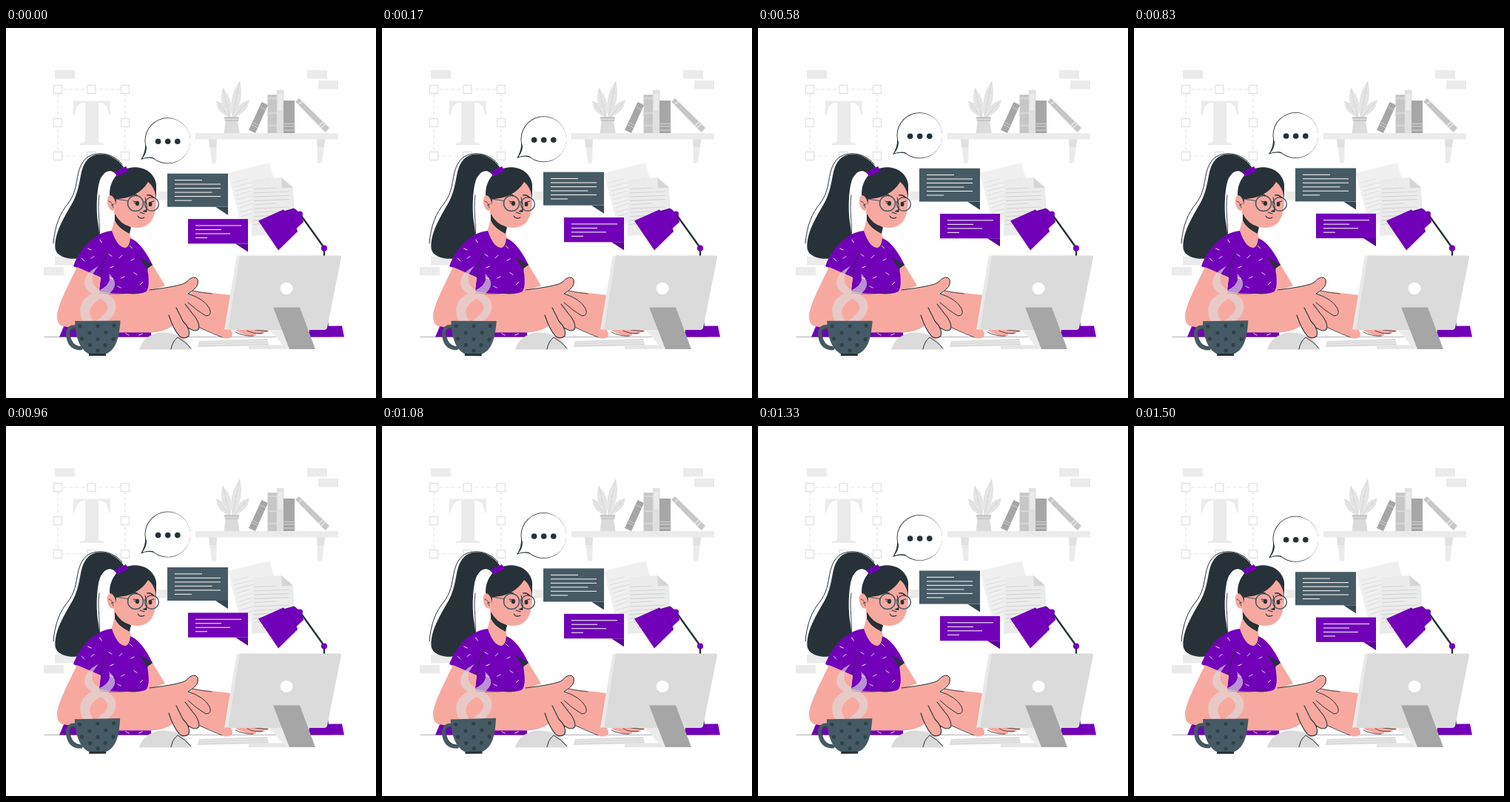
Animation, 500 px wide and 500 px high, one loop 1.54 s. Source, as an HTML page with a canvas:

```html
<!DOCTYPE html>
<html lang="en">
<head>
<meta charset="utf-8">
<style>
html, body { margin: 0; width: 100%; height: 100%; overflow: hidden; background: #fff; }
canvas { display: block; width: 100vw; height: 100vh; }
</style>
</head>
<body>
<canvas id="stage"></canvas>
<script>
const LOOP = 1540;
const LEAD = 55;
const PURPLE = '#7200b8', DEEP = '#5b0099', INK = '#263238', SLATE = '#455a64', SKIN = '#f7a9a0';
const PALE = '#ebebeb', LIGHT = '#e0e0e0', GREY = '#dbdbdb', MID = '#c7c7c7', DARK = '#a6a6a6';

const canvas = document.getElementById('stage');
const ctx = canvas.getContext('2d');

function fill(color, d) {
  ctx.fillStyle = color;
  ctx.fill(new Path2D(d));
}

function line(color, width, d) {
  ctx.strokeStyle = color;
  ctx.lineWidth = width;
  ctx.stroke(new Path2D(d));
}

function rect(color, x, y, w, h) {
  ctx.fillStyle = color;
  ctx.fillRect(x, y, w, h);
}

function oval(color, x, y, rx, ry = rx, turn = 0) {
  ctx.fillStyle = color;
  ctx.beginPath();
  ctx.ellipse(x, y, rx, ry, turn, 0, 7);
  ctx.fill();
}

function ring(color, width, x, y, r) {
  ctx.strokeStyle = color;
  ctx.lineWidth = width;
  ctx.beginPath();
  ctx.arc(x, y, r, 0, 7);
  ctx.stroke();
}

function at(x, y, turn, draw) {
  ctx.save();
  ctx.translate(x, y);
  ctx.rotate(turn);
  draw();
  ctx.restore();
}

function drawWall() {
  for (const [x, y] of [[66, 57], [407, 57], [422, 71], [66, 309], [51, 323], [205, 221]])
    rect(PALE, x, y, 27, 11.5);

  ctx.setLineDash([4, 4]);
  line('#e4e4e4', 1.2, 'M70 83H161V173H70Z');
  ctx.setLineDash([]);
  for (const x of [70, 115.5, 161])
    for (const y of [83, 128, 173]) {
      if (x === 115.5 && y === 128) continue;
      rect('#fff', x - 5.5, y - 5.5, 11, 11);
      line('#e4e4e4', 1.3, `M${x - 5.5} ${y - 5.5}h11v11h-11Z`);
    }
  fill(PALE, 'M91 98.5H140.5L141 117H139C137 106 134 101 125 101V150C125 155 127 155.5 132 156V158H100V156C105 155.5 107 155 107 150V101C98 101 95 106 92.5 117H90.5Z');
}

function drawLeaf(x, y, turn, length, width) {
  at(x, y, turn, () => {
    fill('#e6e6e6', `M0 0C${-width} ${-length * .35} ${-width} ${-length * .7} 0 ${-length}C${width} ${-length * .7} ${width} ${-length * .35} 0 0`);
    line('#cfcfcf', .7, `M0 0V${-length}`);
    for (let k = .35; k < .8; k += .15)
      line('#dadada', .5, `M${-width * .5} ${-length * k - 4}L0 ${-length * k}L${width * .5} ${-length * k - 4}`);
  });
}

function drawShelf() {
  for (const x of [274, 420]) {
    const lean = x < 300 ? 3 : 0;
    fill(PALE, `M${x} 150H${x + 11}L${x + 7 + lean} 182.5H${x + 1 + lean}Z`);
    fill(LIGHT, `M${x} 150H${x + 11}L${x + 10} 161H${x + 1}Z`);
  }
  rect(PALE, 256, 142, 193, 8.5);

  drawLeaf(303, 121, -.7, 29, 7);
  drawLeaf(307, 121, .75, 32, 7);
  drawLeaf(303, 121, -.25, 41, 8);
  drawLeaf(306, 121, .2, 50, 8);
  fill(GREY, 'M297 125H313L315.5 142H294.5Z');
  fill(MID, 'M295 120H315L314 126H296Z');
  line(PALE, .8, 'M295 123.5H315');

  fill(DARK, 'M328 138L345.5 100L354 104L337 142Z');
  line(MID, 1.3, 'M342.5 106.5L351 110.5M333 127.5L341.5 131.5M331.5 130.5L340 134.5');
  rect(MID, 353.5, 90, 13, 52);
  line(GREY, 1.4, 'M353.5 95H366.5M353.5 115H366.5M353.5 132H366.5');
  rect(LIGHT, 366, 84, 9.5, 58);
  rect(PALE, 367.5, 89, 6, 23);
  rect(DARK, 375, 98, 15, 44);
  line(MID, 1.4, 'M375 129.5H390M375 133H390M375 138H390');
  fill(MID, 'M391 99.5L396 95L437 135L431.5 141Z');
  line(PALE, 1.5, 'M395 103.5L400.5 99M423 132L428.5 126.5M426 135L431.5 129.5');
}

function drawPapers() {
  fill('#f0f0f0', 'M299.5 196L356.5 182L374 252L318 267Z');
  for (let i = 0; i < 9; i++)
    line('#dedede', 1.1, `M${307 + i * 1.4} ${209 + i * 5.7}L${i % 3 ? 354 + i : 327 + i} ${i % 3 ? 197.5 + i * 5.5 : 204 + i * 5.5}`);
  fill(PALE, 'M333 205L372 202L388 216L391 277L332 281Z');
  fill('#d6d6d6', 'M372 202L388 215.5L373 216.5Z');
  for (let i = 0; i < 10; i++)
    line('#d4d4d4', 1.1, `M${336 - i * .1} ${217.5 + i * 5.3}L${i % 4 === 0 ? 365 : 382} ${216 + i * 5.2}`);
}

function drawLamp() {
  line(INK, 2.4, 'M397 251L430 297V310');
  line(INK, 2, 'M434 394L435 405');
  fill(DEEP, 'M373 248L389 243.5Q399 251 402 262L389 274Z');
  fill(PURPLE, 'M375 249L391 244.5Q400 252 402 262L392 271Z');
  fill(PURPLE, 'M341 260.5L374.5 245.5Q388 256 394 275L368 300.5Z');
  line(DEEP, .8, 'M375 246Q388 256 393.5 275');
  oval(PURPLE, 397, 251.5, 4);
  oval(PURPLE, 430, 297.5, 4.1);
  fill(PURPLE, 'M411 403L454 402.5L457 417.5H408Z');
}

function drawPonytail() {
  line(INK, 1, 'M64 291C66 267 73 250 84 237C99 217 93 197 104 181C113 166 142 165 157 184');
  fill(INK, 'M159 188C147 171 127 166 113 175C97 189 104 208 91 234C79 255 65 277 66.5 298C69 313 96 315 112 308C130 300 127 282 124.5 265C121 243 123 213 128 203C134 192 143 189 151 201Z');
  line(INK, .9, 'M126 226C123 248 128 265 126 288');
}

function drawHead() {
  fill(SKIN, 'M145 235L147 258L142 276Q150 299 162 298Q169 297 169 284L166 274L171 258Z');
  fill(INK, 'M147 251Q154 265 169 269L167 278Q151 270 147 260Z');
  fill(INK, 'M141 232C137 214 146 196 163 190C183 184 200 194 203 211L203 232L150 240Z');
  fill(SKIN, 'M149 231C167 231 184 222 192 208C198 213 203 221 203 235C202 258 194 270 177 270C163 270 151 258 148 244Z');
  oval(SKIN, 142.5, 236.5, 5.5, 10.5, -.2);
  line(INK, .8, 'M139 234Q144 235 145 243M142 240L146 238');
  fill(PURPLE, 'M147 194L162 187L166 193L150 201Z');
  line(DEEP, .8, 'M151 197L161 191');

  line(SLATE, 1.2, 'M147 231L165 233.5M185.5 236Q187 234 189 236');
  ring(SLATE, 1.5, 175, 237, 10.5);
  ring(SLATE, 1.5, 197, 238, 9.3);
  oval(INK, 177.5, 237, 2.5, 3.2);
  oval(INK, 195, 238, 2.4, 3.2);
  line(INK, 1, 'M172 234L177 235M173 236.5L176 237M196 235L200 234');
  line(INK, 1.6, 'M167 227Q171 223.5 177 226M191 226Q196 225 199 229');
  line(INK, 1, 'M188 229Q191 240 190 248');
  fill(INK, 'M190 245L190 249L184 248Z');
  line(INK, 1.1, 'M181 249L187 251M178 254Q181 259 187 256');
}

function drawShirt() {
  fill(SKIN, 'M190 322L198 320L215 348L190 357Z');
  fill(PURPLE, 'M72 417.5L79 401H196V417.5Z');
  fill(PURPLE, 'M143 274C148 289 154 297 162 297Q167 295 168 284C179 288 189 302 198 320L191 325Q194 342 192 351L188 360H125L128 337L91 322C98 302 116 277 143 274Z');
  fill(INK, 'M179 309Q188 314 198 320L191 325Z');
  line(INK, 1, 'M136 304Q129 321 128 337M183 312Q190 320 191 326');

  const threads = [[113, 299, .4], [128, 288, 1], [104, 313, .8], [117, 310, -.6], [141, 307, .6],
    [143, 323, -.4], [155, 309, -.8], [169, 296, .7], [171, 313, -.5], [175, 332, .6],
    [158, 337, -.5], [142, 338, .4], [183, 345, -.8], [153, 350, .5],
    [164, 414, .5], [182, 414, -.4]];
  for (const [x, y, turn] of threads)
    at(x, y, turn, () => line('#e6d2f3', .9, 'M-2.5 0H2.5'));
}

function drawDesk() {
  line('rgba(38,50,56,.75)', .5, 'M52 417.5H440');
  fill(GREY, 'M180 434.5C184 419 200 411 214 411.5C234 412 248 423 250.5 434.5Z');
  line(INK, 1, 'M223 434Q225 423 232 418Q243 424 250 433');
  fill(GREY, 'M261 423L353 420L355 429L259 431Z');
  line('#efefef', .8, 'M262 425L353 422.5M261 428L354 425.5');
}

function drawArms() {
  fill(SKIN, 'M252 355Q278 358 304 361L299 402Q306 408 306 415Q304 421 294 419Q278 411 260 405L240 382Z');
  line(INK, .8, 'M252 355Q264 358 278 359M262 405Q279 413 292 418');
  fill(SKIN, 'M308 407H355Q355 412 346 411Q350 415 338 413Q340 418 328 416Q316 413 308 407Z');
  line(INK, .8, 'M310 411Q322 417 334 416M326 409Q338 415 348 412M337 408L354 410');

  fill(SKIN, 'M96 323C83 350 69 376 69 390Q69 403 80 403.5Q102 409 151 411.5H196Q214 411 226 402L234 417Q240 423 247 416Q250 410 245 404Q257 413 261 405Q262 395 250 379L246 371Q258 382 270 389Q279 389 275 379Q268 366 246 359Q263 350 259 339Q254 333 243 344Q235 349 194 354Q184 361 164 359Q143 359 126 356L128 337Z');
  line(INK, 1, 'M194 354Q235 349 243 344Q254 332 259 340Q262 350 246 359Q268 366 275 379Q279 389 270 389Q258 382 246 371');
  line(INK, 1.1, 'M220 388Q226 407 235 417Q242 421 247 416Q250 407 239 396L230 378M246 405Q258 413 261 405Q261 396 252 386L242 373');
  line(INK, .8, 'M127 358Q155 361 184 356');
}

function drawMonitor() {
  fill('#e9e9e9', 'M312 307.5H320L304 407.5H295Z');
  fill(GREY, 'M316 307.5H450Q453.5 307.5 453 310L434 405Q433 408 430 408H300Z');
  oval('#fff', 379, 352, 8.5, 8, -.3);
  rect('#e6e6e6', 328, 428.5, 58, 5.5);
  fill(PALE, 'M356 408H373L384 434H379Z');
  fill(DARK, 'M361 377.5H397L418 434H383Z');
}

function drawSpeech() {
  oval(INK, 218.3, 153, 30.8, 31);
  fill(INK, 'M188 157Q189 168 182 178.8Q191 175 200 177.5L212 168Z');
  oval('#fff', 218.8, 153, 30.4, 30.3);
  fill('#fff', 'M190 162Q190 170 184.3 177Q192 174 201 176L212 168Z');
  for (const x of [205.6, 218.7, 231.8]) oval(INK, x, 154, 3.8);
}

function drawMessage(x, y, w, h, color, shade, lengths) {
  fill(shade, `M${x + w - 17} ${y + h}h17v11Z`);
  rect(color, x, y, w, h);
  lengths.forEach((length, i) => rect('#eee', x + 10, y + 8.3 + i * 5.5, length, 1.1));
}

function drawSteam() {
  fill('rgba(224,219,222,.66)',
    'M125 322C106 330 101 347 112 356C125 365 137 368 137 378C136 387 128 391 122 396H137C150 387 152 372 143 364C133 356 119 353 117 343C115 333 120 328 125 322Z' +
    'M139 332C144 346 131 353 118 358C101 365 96 380 104 396H118C109 384 114 374 126 367C144 359 156 346 139 332Z');
}

function drawMug() {
  line(SLATE, 5, 'M95 404Q84 402 83.5 414Q85 433 101 433');
  line('#37474f', 1.2, 'M95 406.5Q86 404 86 414Q88 430 101 431');
  fill(INK, 'M112 439H135V443H112Z');
  fill(SLATE, 'M93 396L154.5 395.5C153 418 149 434 136 440H111C99 433 94 418 93 396Z');
  const dots = [[100, 403], [124, 402.5], [146, 402], [113, 412], [135, 411.5], [102.5, 420],
    [124, 420.5], [145, 420.5], [113.5, 428.5], [134, 428.5], [124, 436]];
  for (const [x, y] of dots) oval('#2f424b', x, y, 2.6);
}

// Triangle wave: 0 at phase 0, 1 at a quarter, -1 at three quarters.
function triangle(phase) {
  return 1 - 4 * Math.abs((phase + .25) % 1 - .5);
}

function drawScene(time) {
  const phase = (time + LEAD) / LOOP;
  const lift = 4.7 * (1 + triangle(phase + .75));
  const sway = 1.2 * Math.PI / 180 * triangle(phase);

  rect('#fff', 0, 0, 500, 500);
  drawWall();
  drawShelf();
  drawPapers();
  drawLamp();
  drawPonytail();
  drawHead();
  drawShirt();
  drawDesk();
  drawArms();
  drawMonitor();
  at(0, -lift, 0, () => {
    drawSpeech();
    drawMessage(218, 197.4, 82, 45, SLATE, '#37474f', [37, 62, 62, 50.5, 62, 23]);
    drawMessage(246, 258.8, 81, 33.3, PURPLE, DEEP, [62, 35, 47, 16]);
  });
  drawSteam();
  at(118, 419, sway, () => {
    ctx.translate(-118, -419);
    drawMug();
  });
}

function resize() {
  const ratio = window.devicePixelRatio || 1;
  canvas.width = innerWidth * ratio;
  canvas.height = innerHeight * ratio;
}

function frame() {
  ctx.setTransform(canvas.width / 500, 0, 0, canvas.height / 500, 0, 0);
  ctx.lineCap = 'round';
  ctx.lineJoin = 'round';
  drawScene(performance.now() % LOOP);
  requestAnimationFrame(frame);
}

addEventListener('resize', resize);
resize();
frame();
</script>
</body>
</html>
```
